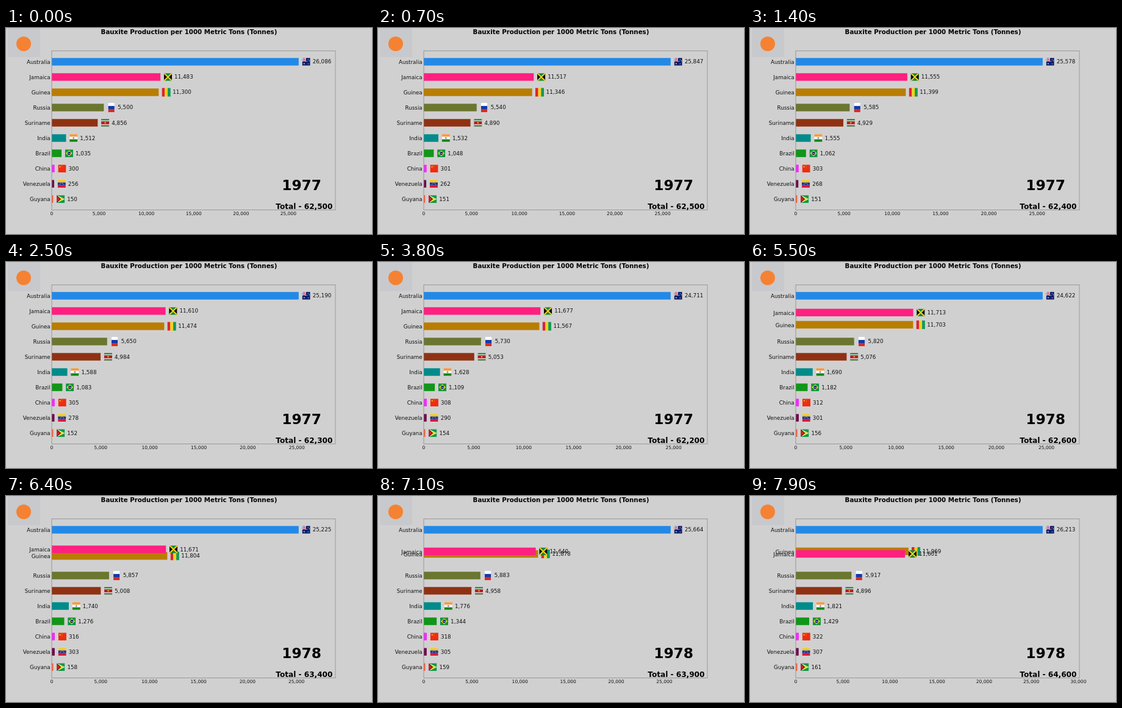
Animation of 600 by 338 pixels, one loop 8 s. Source, as an HTML page with a canvas:

```html
<!DOCTYPE html>
<html lang="en">
<head>
<meta charset="utf-8">
<title>Bauxite Production</title>
<style>
  html, body { margin: 0; width: 100%; height: 100%; overflow: hidden; background: #d1d0d1; }
  canvas { display: block; width: 600px; height: 338px; }
</style>
</head>
<body>
<canvas id="stage"></canvas>
<script>
const W = 600, H = 338, LOOP = 8000, FRAME = 100;
const STEPS = 60;                       // data steps per year
const LEFT = 75, RIGHT = 540, TOP = 37.5, BOTTOM = 298.5, LONGEST = 404.8;
const ROW0 = 55.4, ROW = 25.03, BAR = 12.4;
const FONT = '"DejaVu Sans", sans-serif';

const canvas = document.getElementById('stage');
const ctx = canvas.getContext('2d');
const dpr = window.devicePixelRatio || 1;
canvas.width = W * dpr;
canvas.height = H * dpr;

function rect(color, x, y, w, h) {
  ctx.fillStyle = color;
  ctx.fillRect(x, y, w, h);
}
function poly(color, ...pts) {
  ctx.fillStyle = color;
  ctx.beginPath();
  for (let i = 0; i < pts.length; i += 2) ctx.lineTo(pts[i], pts[i + 1]);
  ctx.fill();
}
function line(color, width, ...pts) {
  ctx.strokeStyle = color;
  ctx.lineWidth = width;
  ctx.beginPath();
  for (let i = 0; i < pts.length; i += 4) {
    ctx.moveTo(pts[i], pts[i + 1]);
    ctx.lineTo(pts[i + 2], pts[i + 3]);
  }
  ctx.stroke();
}
function dot(color, x, y, r) {
  ctx.fillStyle = color;
  ctx.beginPath();
  ctx.arc(x, y, r, 0, Math.PI * 2);
  ctx.fill();
}
function star(color, x, y, r) {
  ctx.fillStyle = color;
  ctx.beginPath();
  for (let i = 0; i < 10; i++) {
    const a = i * Math.PI / 5 - Math.PI / 2, d = i % 2 ? r * 0.4 : r;
    ctx.lineTo(x + d * Math.cos(a), y + d * Math.sin(a));
  }
  ctx.fill();
}
function text(str, x, y, size, align, bold) {
  ctx.font = (bold ? 'bold ' : '') + size + 'px ' + FONT;
  ctx.textAlign = align;
  ctx.fillStyle = bold ? '#000' : '#111';
  ctx.fillText(str, x, y);
}
function bands(w, h, colors) {
  const d = h / colors.length;
  colors.forEach((c, i) => rect(c, 0, i * d, w, d));
}

// Each flag paints into a w by h box at the origin.
const flags = {
  Australia(w, h) {
    rect('#0a1f6b', 0, 0, w, h);
    line('#fff', 1.2, 0, 0, 6.4, 6, 6.4, 0, 0, 6);
    line('#fff', 2, 3.2, 0, 3.2, 6, 0, 3, 6.4, 3);
    line('#d8203a', 1, 3.2, 0, 3.2, 6, 0, 3, 6.4, 3);
    star('#fff', 3.3, 9.3, 1.5);
    for (const [x, y] of [[9.8, 2.4], [8, 5.4], [11.6, 4.8], [9.8, 9.8]]) star('#fff', x, y, 1);
  },
  Jamaica(w, h) {
    rect('#0b8a3a', 0, 0, w, h);
    poly('#0a0a0a', 0, 0, w / 2, h / 2, 0, h);
    poly('#0a0a0a', w, 0, w / 2, h / 2, w, h);
    line('#f7d020', 2, 0, 0, w, h, w, 0, 0, h);
  },
  Guinea(w, h) {
    ['#dc2434', '#fad116', '#129a5a'].forEach((c, i) => rect(c, i * w / 3, 0, w / 3, h));
  },
  Russia(w, h) { bands(w, h, ['#fff', '#1238a8', '#d92a20']); },
  Suriname(w, h) {
    rect('#2f7a3a', 0, 0, w, h);
    rect('#fff', 0, 2.5, w, h - 5);
    rect('#b81c32', 0, 3.7, w, h - 7.4);
    star('#f0c818', w / 2, h / 2, 2);
  },
  India(w, h) {
    bands(w, h, ['#ff9a32', '#fff', '#128808']);
    dot('#34449c', w / 2, h / 2, 1.3);
    dot('#dcdcec', w / 2, h / 2, 0.7);
  },
  Brazil(w, h) {
    rect('#0a963a', 0, 0, w, h);
    poly('#fcdc08', 1.1, h / 2, w / 2, 1.4, w - 1.1, h / 2, w / 2, h - 1.4);
    dot('#142a78', w / 2, h / 2, 2.8);
    line('#fff', 0.6, w / 2 - 2.6, h / 2 - 0.6, w / 2 + 2.5, h / 2 + 0.9);
  },
  China(w, h) {
    rect('#ee2c10', 0, 0, w, h);
    star('#ffd820', 3, 3.4, 1.7);
    for (const [x, y] of [[5.6, 1.4], [6.5, 2.7], [6.5, 4.4], [5.6, 5.7]]) dot('#ffc020', x, y, 0.4);
  },
  Venezuela(w, h) {
    bands(w, h, ['#fccc10', '#10309c', '#d81a38']);
    for (let i = 0; i < 7; i++) {
      const a = Math.PI * (1.08 + i * 0.14);
      dot('#fff', w / 2 + 3.1 * Math.cos(a), 8 + 3 * Math.sin(a), 0.45);
    }
  },
  Guyana(w, h) {
    rect('#0c9a48', 0, 0, w, h);
    poly('#fff', 0, 0, w, h / 2, 0, h);
    poly('#fcd410', 0, 0.8, w - 1.2, h / 2, 0, h - 0.8);
    poly('#101010', 0, 0, w / 2 + 0.3, h / 2, 0, h);
    poly('#d81c2c', 0, 0.9, w / 2 - 0.8, h / 2, 0, h - 0.9);
  }
};
const flagSize = { Guinea: [14.4, 14.4], Russia: [10.4, 15.4] };

// name, bar colour, values at the start of 1977, 1978 and 1979
const rows = [
  ['Australia', '#2389e6', 26086, 24293, 27584],
  ['Jamaica', '#ff2080', 11483, 11736, 11505],
  ['Guinea', '#b97d00', 11300, 11648, 12199],
  ['Russia', '#6b762f', 5500, 5800, 6000],
  ['Suriname', '#8f3213', 4856, 5112.9, 4741],
  ['India', '#008b8b', 1512, 1663, 1934],
  ['Brazil', '#109618', 1035, 1131, 1642],
  ['China', '#f22cfa', 300, 310, 330],
  ['Venezuela', '#6b0d4b', 256, 300, 312],
  ['Guyana', '#f4623c', 150, 154.9, 165]
];
const totals = [62500, 62160, 66380];
const order = [0, 2, 1, 3, 4, 5, 6, 7, 8, 9];   // Jamaica passes in front of Guinea

const comma = v => String(Math.round(v)).replace(/\B(?=(\d{3})+$)/g, ',');

function draw(ms) {
  const step = Math.round(Math.floor((ms % LOOP) / FRAME) * 1.2);
  const year = Math.floor(step / STEPS), part = step / STEPS - year;
  const at = v => v[year] + (v[year + 1] - v[year]) * part;
  const swap = year ? part : 0;

  const items = rows.map(([name, color, ...v], i) => {
    const rank = i + (i === 1 ? swap : i === 2 ? -swap : 0);
    return { name, color, value: at(v), y: ROW0 + ROW * rank };
  });
  const scale = LONGEST / items[0].value;
  for (const it of items) it.end = LEFT + it.value * scale;
  const stack = order.map(i => items[i]);

  ctx.setTransform(dpr, 0, 0, dpr, 0, 0);
  rect('#d1d0d1', 0, 0, W, H);
  rect('#c8c9cc', 3, 0, 53, 48);
  dot('#f58232', 29, 26, 12);

  for (const it of stack) rect(it.color, LEFT, it.y - BAR / 2, it.end - LEFT, BAR);

  ctx.strokeStyle = '#8c8c8c';
  ctx.lineWidth = 0.8;
  ctx.strokeRect(LEFT, TOP, RIGHT - LEFT, BOTTOM - TOP);

  for (const it of stack) {
    const [w, h] = flagSize[it.name] || [13.2, 12.6];
    ctx.save();
    ctx.translate(it.end + 12.3 - w / 2, it.y - h / 2);
    ctx.beginPath();
    ctx.rect(0, 0, w, h);
    ctx.clip();
    flags[it.name](w, h);
    ctx.restore();
  }

  for (const it of items) {
    text(it.name, 72.7, it.y + 3.7, 8.75, 'right');
    text(comma(it.value), it.end + 22.9, it.y + 3, 8.75, 'left');
  }
  for (let v = 0; LEFT + v * scale <= RIGHT; v += 5000)
    text(comma(v), LEFT + v * scale, 306.8, 7.5, 'center');

  text('Bauxite Production per 1000 Metric Tons (Tonnes)', 300, 10.2, 10.25, 'center', true);
  text(String(1977 + year), 484.6, 266.2, 23.3, 'center', true);
  text('Total - ' + comma(Math.round(at(totals) / 100) * 100), 535.4, 296.7, 12.1, 'right', true);
}

const start = performance.now();
function tick(now) {
  draw(Math.max(0, now - start));
  requestAnimationFrame(tick);
}
draw(0);
requestAnimationFrame(tick);
</script>
</body>
</html>
```
